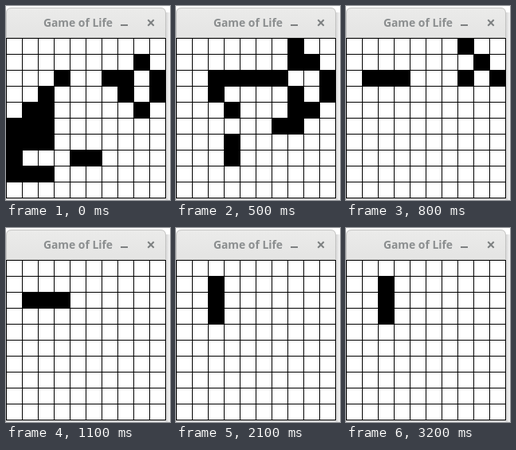
An HTML page that plays this animation: 206x243 px, repeating every 3.7 s.

```html
<!DOCTYPE html>
<html lang="en">
<head>
<meta charset="utf-8">
<title>Game of Life</title>
<style>
  html, body { margin: 0; width: 100%; height: 100%; overflow: hidden; background: #fff; }
  svg { display: block; }
  .title { font: 700 13.9px "Open Sans", "Noto Sans", sans-serif; fill: #8b8e8f; text-anchor: middle; }
  .icon { stroke: #7d8081; stroke-width: 2; fill: none; }
  .crisp { shape-rendering: crispEdges; }
</style>
</head>
<body>
<svg width="206" height="243" viewBox="0 0 206 243">
  <defs>
    <linearGradient id="bar" x1="0" y1="0" x2="0" y2="1">
      <stop offset="0" stop-color="#ebebea"/>
      <stop offset="1" stop-color="#e4e4e3"/>
    </linearGradient>
    <linearGradient id="side">
      <stop offset="0" stop-color="#d6d6d6"/>
      <stop offset="1" stop-color="#f6f6f6"/>
    </linearGradient>
    <linearGradient id="under" x1="0" y1="0" x2="0" y2="1">
      <stop offset="0" stop-color="#cfcfcf"/>
      <stop offset="1" stop-color="#e2e2e2"/>
    </linearGradient>
  </defs>
  <rect x="201" y="8" width="5" height="235" fill="url(#side)"/>
  <rect y="241" width="203" height="2" fill="url(#under)"/>
  <path d="M0 40V9Q0 2 7 2H194Q201 2 201 9V40Z" fill="url(#bar)"/>
  <path d="M.5 40V9Q.5 2.5 7 2.5H194Q200.5 2.5 200.5 9V40" fill="none" stroke="#c4c4c3"/>
  <rect class="crisp" y="39" width="201" height="1" fill="#d2d2d0"/>
  <text class="title" x="90.5" y="26">Game of Life</text>
  <path class="icon" d="M144 24H153M178.3 17.3L185.7 24.7M185.7 17.3L178.3 24.7"/>
  <rect class="crisp" y="40" width="201" height="201" fill="#fff"/>
  <path class="crisp" id="lines"/>
  <path class="crisp" id="cells"/>
</svg>
<script>
const SIZE = 10, CELL = 20, TOP = 40, LOOP = 3700;
const STEPS = [0, 100, 200, 300, 400, 500, 600, 700, 800,
  1000, 1100, 1200, 1300, 2100, 2400, 2600, 2700, 3200];
const SEED = ["", "8", "3679", "279", "128", "012", "012", "045", "012", ""];

const range = [...Array(SIZE).keys()];
const box = (x, y, w, h) => `M${x} ${y}h${w}v${h}h${-w}z`;

// Neighbours in the first row or column are never counted.
function neighbours(grid, r, c) {
  let n = 0;
  for (let y = Math.max(1, r - 1); y <= Math.min(SIZE - 1, r + 1); y++)
    for (let x = Math.max(1, c - 1); x <= Math.min(SIZE - 1, c + 1); x++)
      if ((y !== r || x !== c) && grid[y][x]) n++;
  return n;
}

function evolve(grid) {
  return grid.map((row, r) => row.map((alive, c) => {
    const n = neighbours(grid, r, c);
    return n === 3 || (alive && n === 2);
  }));
}

function outline(grid) {
  return range.flatMap(r => range.filter(c => grid[r][c])
    .map(c => box(c * CELL, TOP + r * CELL, CELL + 1, CELL + 1))).join("");
}

let grid = SEED.map(row => range.map(c => row.includes(c)));
const shapes = STEPS.map(() => {
  const d = outline(grid);
  grid = evolve(grid);
  return d;
});

document.getElementById("lines").setAttribute("d", [...range, SIZE].map(i =>
  box(i * CELL, TOP, 1, 201) + box(0, TOP + i * CELL, 201, 1)).join(""));

const cells = document.getElementById("cells");
const start = performance.now();
let shown = -1;

function draw() {
  const t = (performance.now() - start) % LOOP;
  const step = STEPS.filter(s => s <= t).length - 1;
  if (step !== shown) cells.setAttribute("d", shapes[shown = step]);
  requestAnimationFrame(draw);
}
draw();
</script>
</body>
</html>
```
